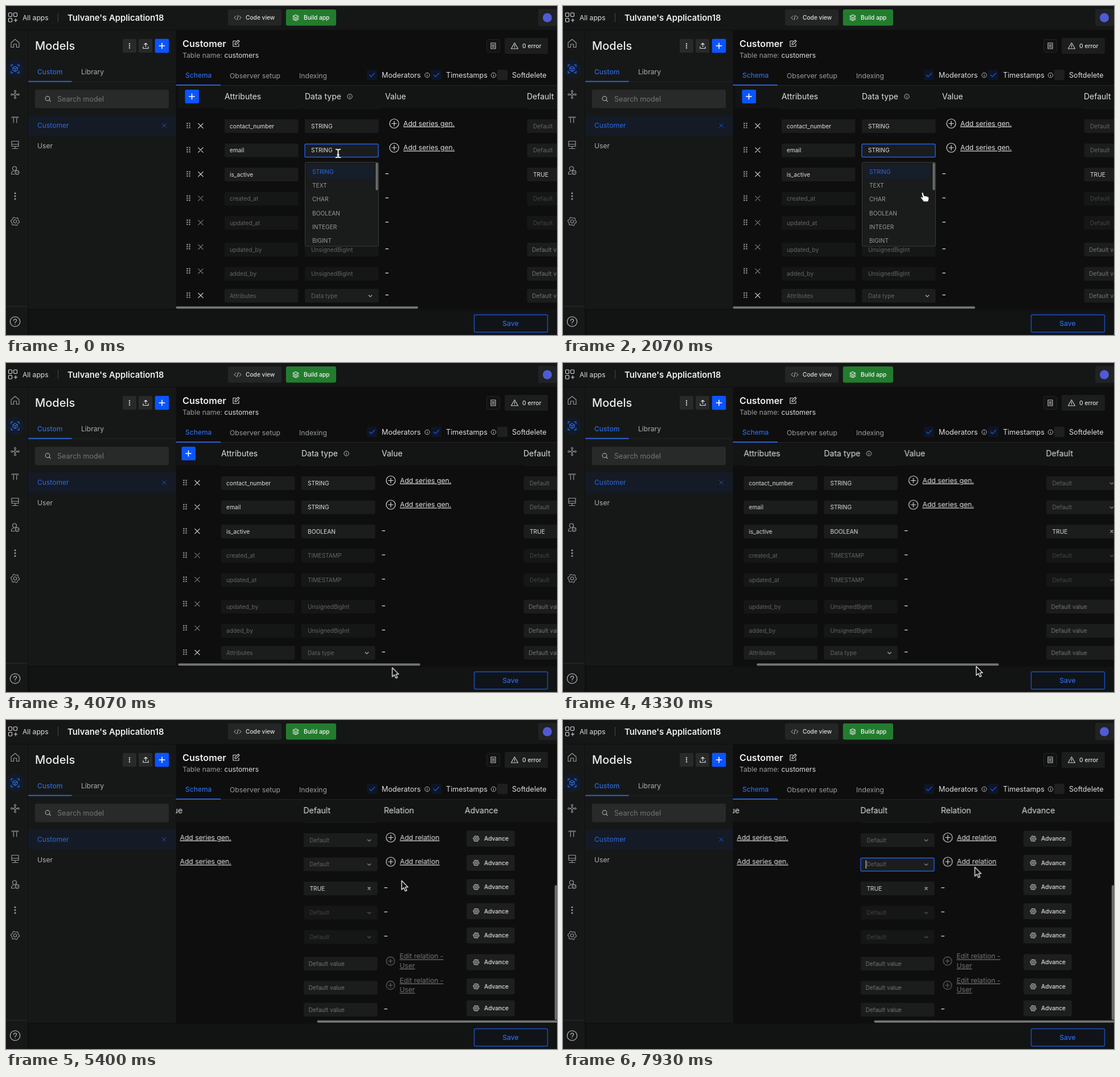
Write an HTML page that moves like this. It is 968 px wide and 578 px high and loops after 8 s.

```html
<!DOCTYPE html>
<html lang="en">
<head>
<meta charset="utf-8">
<title>Model editor</title>
<style>
html, body { margin: 0; width: 100%; height: 100%; overflow: hidden; background: #0e0e0e; }
svg { display: block; width: 968px; height: 578px; font-family: Inter, sans-serif; }
text { white-space: pre; }
.ln { fill: none; stroke-linecap: round; stroke-linejoin: round; }
.u { text-decoration: underline; }

#cursor, #table, #thumb, .menu1, .menu2, .focus2, .caret, .beam, .hand, .arrow {
  animation: 8s linear infinite;
}
#cursor { animation-name: move; }
#table { animation-name: scroll; }
#thumb { animation-name: thumb; }
.menu1, .menu2, .focus2, .caret, .beam, .hand, .arrow { animation-timing-function: step-end; }
.menu1 { animation-name: menu1; }
.menu2 { animation-name: menu2; }
.focus2 { animation-name: focus2; }
.caret { animation-name: caret; }
.beam { animation-name: beam; }
.hand { animation-name: hand; }
.arrow { animation-name: arrow; }

@keyframes move {
  0%, .8% { transform: translate(583.5px, 259px); animation-timing-function: ease-in-out; }
  7.5% { transform: translate(589px, 337px); }
  18.3% { transform: translate(589px, 337px); animation-timing-function: ease-in; }
  25.87% { transform: translate(632px, 327px); animation-timing-function: ease-out; }
  28.37% { transform: translate(706px, 426px); }
  29.1% { transform: translate(706px, 426px); animation-timing-function: ease-in-out; }
  39.1%, 41% { transform: translate(671px, 532.5px); }
  44.1% { transform: translate(674px, 536px); }
  49.1% { transform: translate(674px, 536px); animation-timing-function: steps(3); }
  51.6% { transform: translate(681px, 535px); animation-timing-function: steps(3); }
  54.1% { transform: translate(726px, 533px); animation-timing-function: steps(4); }
  57.45% { transform: translate(893px, 537.5px); animation-timing-function: steps(2); }
  59.1% { transform: translate(930px, 536px); }
  62.5% { transform: translate(930px, 536px); animation-timing-function: ease-in; }
  67.5% { transform: translate(695.5px, 282.5px); animation-timing-function: ease-out; }
  72.5%, 73.3% { transform: translate(595px, 212px); animation-timing-function: ease-in-out; }
  76.6%, 78.3% { transform: translate(600px, 264px); }
  83.3% { transform: translate(602px, 252px); }
  97.4% { transform: translate(602px, 252px); animation-timing-function: ease-out; }
  99.1%, 100% { transform: translate(723.5px, 258.5px); }
}
/* Dragging the bar advances at 15 steps a second */
@keyframes scroll {
  0% { transform: none; }
  49.1% { transform: translateX(0); animation-timing-function: steps(3); }
  51.6% { transform: translateX(-9px); animation-timing-function: steps(3); }
  54.1% { transform: translateX(-66.5px); animation-timing-function: steps(4); }
  57.45% { transform: translateX(-325.2px); animation-timing-function: steps(2); }
  59.1%, 100% { transform: translateX(-392.5px); }
}
@keyframes thumb {
  0% { transform: none; }
  49.1% { transform: translateX(0); animation-timing-function: steps(3); }
  51.6% { transform: translateX(5.7px); animation-timing-function: steps(3); }
  54.1% { transform: translateX(41.7px); animation-timing-function: steps(4); }
  57.45% { transform: translateX(204.7px); animation-timing-function: steps(2); }
  59.1%, 100% { transform: translateX(248px); }
}
@keyframes menu1 { 0% { opacity: 1; } 30%, 100% { opacity: 0; } }
@keyframes menu2 { 0% { opacity: 0; } 79.2% { opacity: 1; } 92.5%, 100% { opacity: 0; } }
@keyframes focus2 { 0% { opacity: 0; } 78.3%, 100% { opacity: 1; } }
@keyframes caret { 0% { opacity: 0; } 79.2% { opacity: 1; } 87.5% { opacity: 0; } 95%, 100% { opacity: 1; } }
@keyframes beam { 0% { opacity: 1; } 2.4%, 100% { opacity: 0; } }
@keyframes hand { 0% { opacity: 0; } 2.4% { opacity: 1; } 26.7%, 100% { opacity: 0; } }
@keyframes arrow { 0% { opacity: 0; } 26.7%, 100% { opacity: 1; } }
</style>
</head>
<body>
<svg id="stage" viewBox="0 0 968 578"></svg>
<script>
const BLUE = '#2c68e0', DEEP = '#1d50c4', LIGHT = '#dededf', GREY = '#747575', DIM = '#646565';
const PANEL = '#161817', FIELD = '#1b1c1c', LOCKED = '#151616';

// Drawing helpers; text is placed by its vertical centre
const text = (x, y, s, size = 10.2, fill = LIGHT, weight = 400, more = '') =>
  `<text x="${x}" y="${y + size * .36}" font-size="${size}" fill="${fill}" font-weight="${weight}" ${more}>${s}</text>`;
const rect = (x, y, w, h, fill, r = 0, more = '') =>
  `<rect x="${x}" y="${y}" width="${w}" height="${h}" rx="${r}" fill="${fill}" ${more}/>`;
const line = (d, color = LIGHT, w = 1.2) => `<path class="ln" d="${d}" stroke="${color}" stroke-width="${w}"/>`;
const disc = (x, y, r, fill) => `<circle cx="${x}" cy="${y}" r="${r}" fill="${fill}"/>`;
const ring = (x, y, r, color = LIGHT, w = 1.2) =>
  `<circle cx="${x}" cy="${y}" r="${r}" fill="none" stroke="${color}" stroke-width="${w}"/>`;
const at = (x, y, s) => `<g transform="translate(${x} ${y})">${s}</g>`;
const outline = (color, w = 1) => `stroke="${color}" stroke-width="${w}"`;

// Icons
const cross = (x, y, r, color, w = 1.2) =>
  at(x, y, line(`M${-r} ${-r}L${r} ${r}M${r} ${-r}L${-r} ${r}`, color, w));
const plus = (x, y, r, color, w) => at(x, y, line(`M${-r} 0H${r}M0 ${-r}V${r}`, color, w));
const plusRing = (x, y, r, color) => ring(x, y, r, color) + plus(x, y, r * .52, color, 1.2);
const chevron = (x, y, color) => at(x, y, line('M-2.7 -1.3L0 1.4L2.7 -1.3', color, 1.3));
const info = (x, y) => ring(x, y, 4.2, '#b8b9b9', 1) + at(x, y, line('M0 -.3V2M0 -2V-1.9', '#b8b9b9', 1.1));
const dots = (x, y, gap, r, color) => [-gap, 0, gap].map(d => disc(x, y + d, r, color)).join('');
const grip = (x, y) => [-2.1, 2.1].map(dx => dots(x + dx, y, 3.7, 1.3, '#929393')).join('');
const gear = (x, y, r, color) => {
  const pts = Array.from({ length: 24 }, (_, i) => {
    const a = i * Math.PI / 12, k = i % 4 < 2 ? r : r * .8;
    return `${(k * Math.cos(a)).toFixed(2)} ${(k * Math.sin(a)).toFixed(2)}`;
  });
  return at(x, y, line(`M${pts.join('L')}Z`, color, 1.1) + ring(0, 0, r * .36, color, 1.1));
};
const check = (x, y) => rect(x - 9, y - 9, 18, 18, '#0d1527', 2) + at(x, y, line('M-4.5 .3L-1.5 3.3L4.5 -3', DEEP, 1.5));

function topBar() {
  return rect(0, 0, 968, 42, '#151616')
    + [[4.5, 12], [4.5, 21.5], [13.5, 12]].map(([x, y]) => rect(x, y, 6, 6.5, 'none', 1.2, outline(LIGHT, 1.1))).join('')
    + plus(17, 25, 2.8, LIGHT, 1.1)
    + text(29, 20.5, 'All apps', 12.1)
    + rect(91, 12, 1, 16, '#464747')
    + text(108, 20.5, "Tulvane's Application18", 14.8, '#f0f0f0', 600)
    + rect(390, 6, 94, 28.5, '#242626', 3)
    + at(407, 20.5, line('M-3 -3L-6 0L-3 3M3 -3L6 0L3 3M1 -4L-1 4', '#c2c3c3', 1))
    + text(421, 20.5, 'Code view', 10.2, LIGHT, 500)
    + rect(491.8, 6, 88.2, 28.5, '#237c2e', 3)
    + at(509, 20.5, line('M0 -5L5 -2.5L0 0L-5 -2.5ZM-5 .2L0 2.7L5 .2M-5 2.8L0 5.3L5 2.8', '#ececec', 1.1))
    + text(523, 20.5, 'Build app', 10.2, '#f8f8f8', 500)
    + rect(935, 5, 33, 30, '#202223', 3) + disc(951, 20.5, 8, '#4f5bd5');
}

function sideBar() {
  const c = '#979999';
  return rect(0, 43, 38, 535, PANEL)
    + at(16, 65.5, line('M-7 -1L0 -7L7 -1V7H2.5V1.5H-2.5V7H-7Z', c))
    + disc(16, 110.5, 16, '#121b2a')
    + at(16, 110.5, line('M-7 -4V-7H-4M4 -7H7V-4M7 4V7H4M-4 7H-7V4M0 -4.5L4 -2.2V2.3L0 4.6L-4 2.3V-2.2ZM-4 -2.2L0 0L4 -2.2M0 0V4.6', BLUE, 1.3))
    + at(16, 155.5, line('M0 -4V-2M0 2V4M-4 0H-2M2 0H4', c) + ring(0, 0, 2, c)
      + [[0, -5.7], [0, 5.7], [-5.7, 0], [5.7, 0]].map(([x, y]) => ring(x, y, 1.5, c, 1.1)).join(''))
    + at(16, 200, line('M-5.5 -3.5V-5H0V-3.5M-2.7 -5V5M0 -3.5V-5H5.5V-3.5M2.7 -5V5', c))
    + at(16, 244, line('M-6 -6.5H6V2.5H-6ZM-6 -1H6M0 2.5V6.5M-5 6.5H5', c))
    + at(16, 289, ring(-1, -3.5, 3.5, c) + line('M-1 6.5H-6.5C-6.5 3 -4.5 1 -2 1', c) + ring(3.5, 3.5, 3.3, c)
      + line('M2 3.5L3.2 4.7L5.2 2.5', c, 1))
    + dots(16, 334, 5, 1.6, c)
    + gear(16, 378.5, 7.5, c)
    + rect(0, 527, 38, 1, '#292b2b')
    + ring(16, 554.5, 8.7, '#aeb0b0', 1.3)
    + at(16, 554.5, line('M-2.5 -1.8C-2.5 -5.4 2.7 -5 2.6 -1.8C2.5 .1 0 0 0 2M0 4.4V4.5', '#aeb0b0', 1.3));
}

function modelPanel() {
  return rect(39, 43, 259.5, 489, PANEL)
    + text(51, 70, 'Models', 20, '#ececec', 500)
    + rect(205, 58, 24, 24, '#282a2a', 2) + dots(217, 70, 3.6, 1.2, LIGHT)
    + rect(233, 58, 24, 24, '#282a2a', 2)
    + at(245.5, 70, line('M-4.5 1.5V4.5H4.5V1.5M0 1.5V-4.5M-2.6 -2.2L0 -4.7L2.6 -2.2'))
    + rect(261.7, 57.7, 24.5, 24.5, '#0a55ff', 2) + plus(274, 70, 4.7, '#fff', 1.6)
    + text(55, 116, 'Custom', 12, BLUE, 500) + text(132, 116, 'Library', 12.1, '#aeafaf')
    + rect(39, 132.5, 259, 1, '#252727') + rect(39, 131.7, 76.5, 1.8, BLUE)
    + rect(51, 147, 235, 32.5, '#282a2a', 3)
    + ring(73, 162.5, 3.8, '#a6a8a8') + line('M75.8 165.3L78 167.5', '#a6a8a8', 1.4)
    + text(90, 163, 'Search model', 12.6, GREY)
    + rect(39, 192, 259.5, 36, '#141b26')
    + text(55, 210, 'Customer', 12.1, BLUE) + cross(278, 210, 3.2, DEEP, 1)
    + text(55, 246, 'User', 12.2, '#aeafaf');
}

function mainHead() {
  return text(310, 66, 'Customer', 16.2, '#f0f0f0', 600)
    + at(404, 66, line('M0 -4.5H-5V5H5V.5M-1.8 1.8L-1.4 -.8L4 -6L6 -4L.8 1.4Z', LIGHT, 1.1))
    + text(310, 87, `Table name: <tspan fill="${LIGHT}">customers</tspan>`, 12.2, '#9a9b9b')
    + rect(844.5, 58.5, 23, 23, '#121313', 3, outline('#232525'))
    + at(856, 70, line('M-4 -5H4V5H-4ZM-2 -2H2M-2 0H2M-2 2.3H2', '#c8c9c9', 1.1))
    + rect(876, 56, 76, 28, '#1c1d1d', 3)
    + at(893.5, 70, line('M0 -5.2L6 5H-6ZM0 -1.6V1.4M0 3.1V3.2', '#d0d1d1', 1.1))
    + text(907, 70, '0 error', 10.3, LIGHT, 500)
    + text(315, 122, 'Schema', 12, BLUE, 500)
    + text(393, 123, 'Observer setup', 12.2, '#9a9b9b') + text(515, 123, 'Indexing', 12.2, '#9a9b9b')
    + check(643, 121) + text(660, 121, 'Moderators', 12.6) + info(740, 121.5)
    + check(756, 121) + text(773, 121, 'Timestamps', 12.6) + info(856.5, 121.5)
    + rect(863, 112, 18, 18, '#1e2020', 2) + text(889, 121, 'Softdelete', 12.6)
    + rect(298.5, 139, 670, 1, '#232525') + rect(298.5, 138, 78.5, 1.8, BLUE);
}

// Table rows: centre, attribute, type, state (0 editable, 1 locked, 2 foreign key, 3 new)
const rows = [
  [168.5, '', '', 0],
  [211, 'contact_number', 'STRING', 0],
  [253.5, 'email', 'STRING', 0],
  [296, 'is_active', 'BOOLEAN', 0],
  [338.5, 'created_at', 'TIMESTAMP', 1],
  [381, 'updated_at', 'TIMESTAMP', 1],
  [428, 'updated_by', 'UnsignedBigInt', 2],
  [470.5, 'added_by', 'UnsignedBigInt', 2],
  [509, 'Attributes', 'Data type', 3]
];

function row([y, name, type, state]) {
  const locked = state === 1 || state === 2;
  const ink = state ? DIM : LIGHT, bool = type === 'BOOLEAN', string = type === 'STRING';
  const gripY = y - (state === 2 ? 5.2 : 1);
  let s = [384, 525].map(x => rect(x, y - 12, 129.5, 24, locked ? LOCKED : FIELD, 2)).join('')
    + rect(915.5, y - 12, 129.5, 24, state === 1 ? LOCKED : FIELD, 2);
  if (!name) return s;
  s += grip(320.5, gripY) + cross(342, gripY + .5, 4.2, locked ? '#7a7c7c' : LIGHT, 1.1)
    + text(393, y, name, 10.2, ink) + text(536, y, type, 10.2, ink)
    + rect(1201.5, y - 16.5, 85, 28, '#1d1f1f', 3) + gear(1218.5, y - 2.5, 5, '#cdcece')
    + text(1232.5, y - 2.5, 'Advance', 10.2, LIGHT, 500);
  if (string) {
    s += plusRing(682, y - 4.5, 8, LIGHT) + text(698, y - 4.7, 'Add series gen.', 12.2, LIGHT, 400, 'class="u"')
      + plusRing(1068.5, y - 4.5, 8, LIGHT) + text(1084.5, y - 4.7, 'Add relation', 12.2, LIGHT, 400, 'class="u"');
  } else {
    s += rect(666.5, y - 2, 5.5, 1.3, LIGHT);
    if (state === 2) {
      s += plusRing(1068, y - 4.5, 7.3, DIM)
        + text(1084, y - 13, 'Edit relation -', 12.2, GREY, 400, 'class="u"')
        + text(1084, y + 3.5, 'User', 12.2, GREY, 400, 'class="u"');
    } else s += rect(1057, y - 2, 5.5, 1.3, LIGHT);
  }
  if (bool) s += text(926, y, 'TRUE') + cross(1030.5, y, 2, '#b8baba', 1.2);
  else if (state > 1) s += text(924, y, 'Default value', 10.2, GREY);
  else s += text(926, y, 'Default', 10.2, state ? '#434444' : DIM) + chevron(1030.5, y + .5, state ? '#555757' : '#868888');
  if (state === 3) s += chevron(640, y + .5, '#aeb0b0');
  return s;
}

function menu(x, options, height) {
  return rect(x + .5, 274.5, 129, height, '#1a1c1c', 2, outline('#383a3a'))
    + options.map((o, i) => (i ? '' : rect(x + 6, 279, 114, 24, '#171e2b'))
      + text(x + 13, 291 + i * 24.35, o, 10.2, i ? '#979999' : BLUE)).join('');
}
const focus = x => rect(x + .5, 242.5, 129, 23, 'none', 2, outline('#1f5ee8', 1.4));

function table() {
  const heads = [[384, 'Attributes'], [525, 'Data type'], [666, 'Value'], [915, 'Default'], [1056.5, 'Relation'], [1198.5, 'Advance']];
  return rows.map(row).join('')
    + rect(302.5, 140, 1100, 39.5, '#131414')
    + rect(314.5, 147, 24.5, 24, '#0a55ff', 2) + plus(326.5, 159, 4.7, '#fff', 1.6)
    + heads.map(([x, s]) => text(x, 159, s, 14)).join('') + info(604, 159)
    + `<g class="menu1">${focus(524.5)}${menu(525, ['STRING', 'TEXT', 'CHAR', 'BOOLEAN', 'INTEGER', 'BIGINT'], 147.5)}
       ${rect(649.5, 275.5, 4, 48, '#6a6b6b', 1.5)}</g>`
    + `<g class="focus2">${focus(915)}</g>`
    + `<g class="menu2">${menu(915, ['NULL', 'CUSTOM'], 57)}${chevron(1030.5, 254, '#d0d2d2')}</g>`
    + `<g class="caret">${rect(924.3, 246.5, 1.1, 14.5, '#f0f0f0')}</g>`
    + rect(1356.5, 290, 4, 237, '#737474', 2);
}

const cursor = `
  <path class="beam" d="M-4.5 -7.3Q-1 -7.3 0 -5.5Q1 -7.3 4.5 -7.3M0 -5.5V5.5M-4.5 7.3Q-1 7.3 0 5.5Q1 7.3 4.5 7.3M-2 2.5H2"
    fill="none" stroke="#fff" stroke-width="1.8"/>
  <path class="hand" d="M-3 1.2C-3.4 -.6 -.6 -1.4 0 .5L1.6 5.5L3.3 5.2L4.6 6L6.2 5.7L7.3 6.9L8.8 6.9L9.8 8.4V11.5L8.4 15.7H.8L-2.6 11.2L-4.6 8.6C-4.8 7 -3 6.6 -2 7.7L-1 8.6Z"
    fill="#fff" stroke="#111" stroke-width=".9"/>
  <path class="arrow" d="M0 0V15.8L3.7 12.4L6.3 18.3L9 17.1L6.4 11.4H11.2Z" fill="#0a0a0a" stroke="#f4f4f4" stroke-width="1.3" stroke-linejoin="round"/>`;

document.getElementById('stage').innerHTML = `
  <clipPath id="view"><rect x="298.5" y="140" width="669.5" height="388"/></clipPath>
  ${rect(0, 0, 968, 578, '#0e0e0e')}
  ${topBar()}${sideBar()}${modelPanel()}${mainHead()}
  <g clip-path="url(#view)"><g id="table">${table()}</g></g>
  ${rect(41, 533.5, 927, 44.5, '#121414')}
  <g id="thumb">${rect(298.5, 527.8, 425.5, 4, '#737474', 2)}</g>
  ${rect(822.5, 542.5, 129, 30.5, '#101419', 2, outline(DEEP, 1.4))}
  ${text(886.5, 557.5, 'Save', 12.2, BLUE, 500, 'text-anchor="middle"')}
  <g id="cursor">${cursor}</g>`;
</script>
</body>
</html>
```
